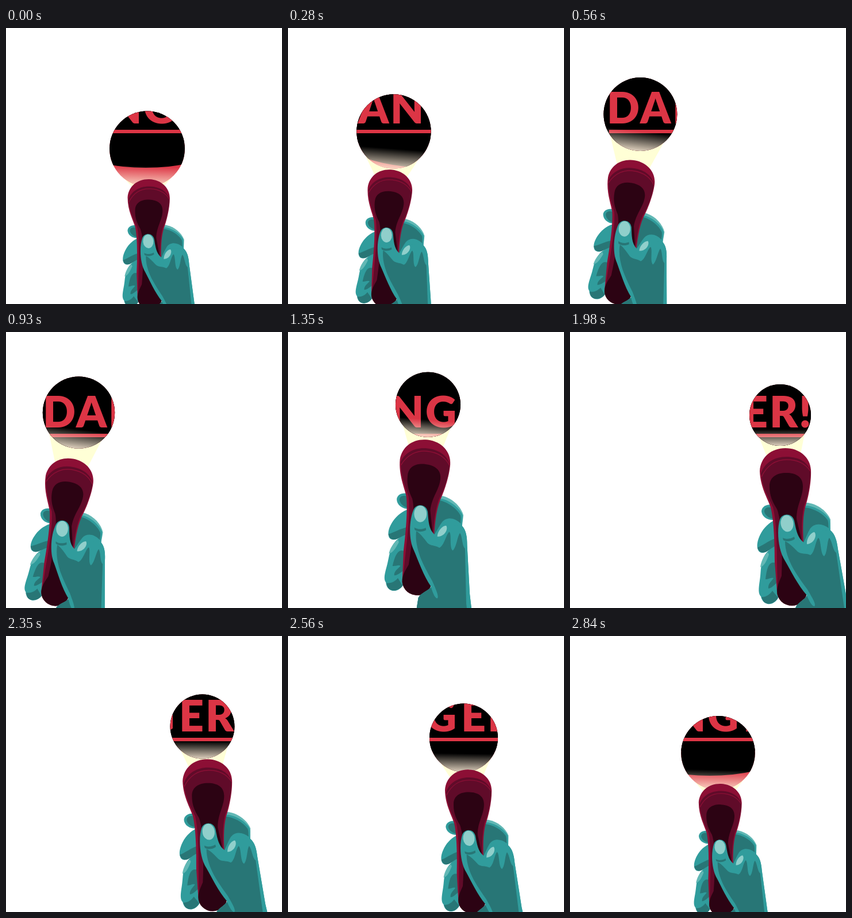
An HTML page for the animation above (2.91 s loop, 480 px wide and 480 px high).

```html
<!DOCTYPE html>
<html lang="en">
<head>
<meta charset="utf-8">
<title>Danger flashlight</title>
<style>
  html, body { margin: 0; width: 100%; height: 100%; overflow: hidden; background: #fff; }
  svg { display: block; width: 100%; height: 100%; }
  text { font: 900 75px Lato, "Open Sans", sans-serif; }
  .red { fill: #dc3545; }
  .teal { fill: #309c9c; }
  .deep { fill: #287676; }
  .soft { fill: #62b8b5; }
  .pale { fill: #90cfcb; }
  .wine { fill: #8c0f35; }
  .body { fill: #600b29; }
  .core { fill: #2c0313; }
</style>
</head>
<body>
<svg viewBox="0 0 480 480">
  <defs>
    <clipPath id="spot"><circle id="hole"/></clipPath>
    <linearGradient id="haze" x1="0" y1="0" x2="0" y2="1">
      <stop offset="0" stop-color="#ffeed8" stop-opacity="0"/>
      <stop offset="1" stop-color="#ffeed8" stop-opacity=".97"/>
    </linearGradient>
  </defs>

  <polygon id="beam" fill="#ffffd6"/>

  <g clip-path="url(#spot)">
    <rect class="red" width="480" height="480"/>
    <ellipse cx="243" cy="135" rx="204" ry="108"/>
    <rect width="480" height="200"/>
    <text class="red" y="166" x="64 122 178 239 301 347 398">DANGER!</text>
    <rect class="red" x="68" y="177" width="349" height="6"/>
    <rect id="glare" x="-1.2" y=".46" width="2.4" height=".6" fill="url(#haze)"/>
  </g>

  <g id="torch">
    <!-- fingers and back of the hand -->
    <path class="teal" d="M354 301C342 298 333 304 333 312C334 322 344 328 356 327Z"/>
    <path class="deep" d="M356 307C345 302 337 306 338 313C340 320 348 325 356 325Z"/>
    <path class="teal" d="M356 327C346 332 337 340 331 352C326 362 324 372 327 379C330 386 338 385 345 380L360 372Z"/>
    <path class="deep" d="M326 375C334 372 345 363 357 359L360 372 345 380C338 385 330 386 326 375Z"/>
    <path class="teal" d="M360 371C345 377 337 387 334 400C331 412 332 420 330 432C328 446 327 455 332 460C334 470 342 474 348 473C355 472 361 466 363 460Z"/>
    <path class="soft" d="M344 383C336 390 332 400 331 409C338 407 342 398 346 387Z"/>
    <path class="deep" d="M352 401C345 403 342 412 340 430C346 430 350 426 354 428C350 434 344 438 345 446C350 446 355 440 360 436L358 401Z"/>
    <path class="deep" d="M333 461C342 461 348 456 352 450L362 462C356 473 342 476 336 468Z"/>
    <path class="soft" d="M400 297L414 297C432 300 447 312 453 326L453 345H400Z"/>
    <path class="teal" d="M400 302L414 302C430 305 444 314 451 325C453 331 452 337 453 345C461 352 464 362 466 378L481 462 500 540H390L392 480C396 468 408 466 412 458L398 420Z"/>
    <path class="deep" d="M402 305C420 304 440 315 448 327C450 332 449 337 450 341C438 332 424 332 417 343C413 350 410 359 406 367L400 350Z"/>

    <!-- flashlight -->
    <path class="wine" d="M330 242C331 218 350 202 374.500 202C399 202 418 218 419 240C420 262 414 290 409 305C404 325 405 350 407 380L412 451A26 25 0 0 1 360 451L356 400C356 360 354 325 349 305C344 290 331 270 330 242Z"/>
    <path class="body" d="M332 246C338 228 355 217 376 217C398 217 412 226 418 240C419 262 413 288 407 303C402 325 403 350 405 380L411 450H361L360 400C360 360 358 325 353 305C346 290 335 272 332 246Z"/>
    <path d="M333 252C342 232 358 222 377 222C396 222 410 230 418 242" fill="none" stroke="#8c0f35" stroke-width="1.5"/>
    <path class="core" d="M347 268C347 252 360 245 376 245C393 245 405 252 405 268C405 288 394 300 394 325L405 372 412 451A26 25 0 0 1 360 451C360 440 366 430 368 424C370 380 368 328 360 308C352 295 347 285 347 268Z"/>

    <!-- thumb and palm -->
    <path class="teal" d="M365 326C369 315 386 314 390 328C393 342 395 358 407 366C414 362 416 350 425 346L453 345C461 352 464 362 466 378L481 462 500 540H390L392 480C396 470 408 466 412 458C396 440 384 415 374 398C362 380 359 345 365 326Z"/>
    <path class="deep" d="M374 364C380 366 388 374 396 382C402 387 410 384 418 388C426 384 427 362 432 358C437 362 435 386 442 390C448 384 447 362 451 358C456 364 457 380 463 384L477 480 492 540H390L392 480C396 470 408 466 412 459C416 468 421 477 425 477C429 474 420 460 413 448C406 438 398 428 388 411C380 396 374 380 374 364Z"/>
    <path class="deep" d="M370 358C376 361 384 360 390 356L391 360C384 365 376 365 371 362Z"/>
    <ellipse class="pale" cx="377.500" cy="333" rx="11" ry="14.500" transform="rotate(-8 377.500 333)"/>
    <path class="pale" d="M412 369C411 360 418 349 425 348C430 353 425 368 412 369Z"/>
  </g>
</svg>
<script>
  const $ = id => document.getElementById(id);
  const STEP = 70, LOOP = 2910, PAUSE = 230;

  // step, spot x, y, radius, torch x, y, angle, scale
  const keys = [
    [0, 245.5, 210, 65.5, 248, 299.3, 2.5, .824],
    [9, 107, 142.5, 63.7, 88, 266.4, 10.8, .932],
    [17, 263, 124, 55.5, 259.2, 225.6, 6.5, .996],
    [25, 365.5, 144.5, 53.5, 374.5, 246, 0, 1],
    [30, 305.5, 177, 59.5, 313.5, 272.5, 1.25, .912],
    [35, 245.5, 210, 65.5, 248, 299.3, 2.5, .824]
  ];

  // The hand rests at the far left and the far right.
  function stepAt(ms) {
    let t = ms % LOOP;
    for (const stop of [9, 25]) {
      const at = stop * STEP;
      if (t >= at) t = Math.max(at, t - PAUSE);
    }
    return Math.floor(t / STEP);
  }

  function poseAt(step) {
    const n = keys.findIndex(k => k[0] > step);
    const a = keys[n - 1], b = keys[n];
    const u = (step - a[0]) / (b[0] - a[0]);
    return a.map((v, i) => v + (b[i] - v) * u).slice(1);
  }

  function draw(ms) {
    const [cx, cy, r, x, y, angle, s] = poseAt(stepAt(ms));
    const hole = $("hole");
    hole.setAttribute("cx", cx);
    hole.setAttribute("cy", cy);
    hole.setAttribute("r", r);
    $("glare").setAttribute("transform",
      `translate(${cx} ${cy}) rotate(${angle * .7}) scale(${r})`);
    $("torch").setAttribute("transform",
      `translate(${x} ${y}) rotate(${angle}) scale(${s}) translate(-374.5 -246)`);

    const tilt = Math.atan2(cx - x, y - cy);
    const cos = Math.cos(tilt), sin = Math.sin(tilt);
    const point = (ox, oy, dx, dy) => [ox + dx * cos - dy * sin, oy + dx * sin + dy * cos];
    $("beam").setAttribute("points", [
      point(cx, cy, -.75 * r, .64 * r), point(cx, cy, .75 * r, .64 * r),
      point(x, y, 26 * s, -20 * s), point(x, y, -26 * s, -20 * s)
    ].join(" "));
  }

  const start = performance.now();
  function tick() {
    draw(performance.now() - start);
    requestAnimationFrame(tick);
  }
  tick();
</script>
</body>
</html>
```
